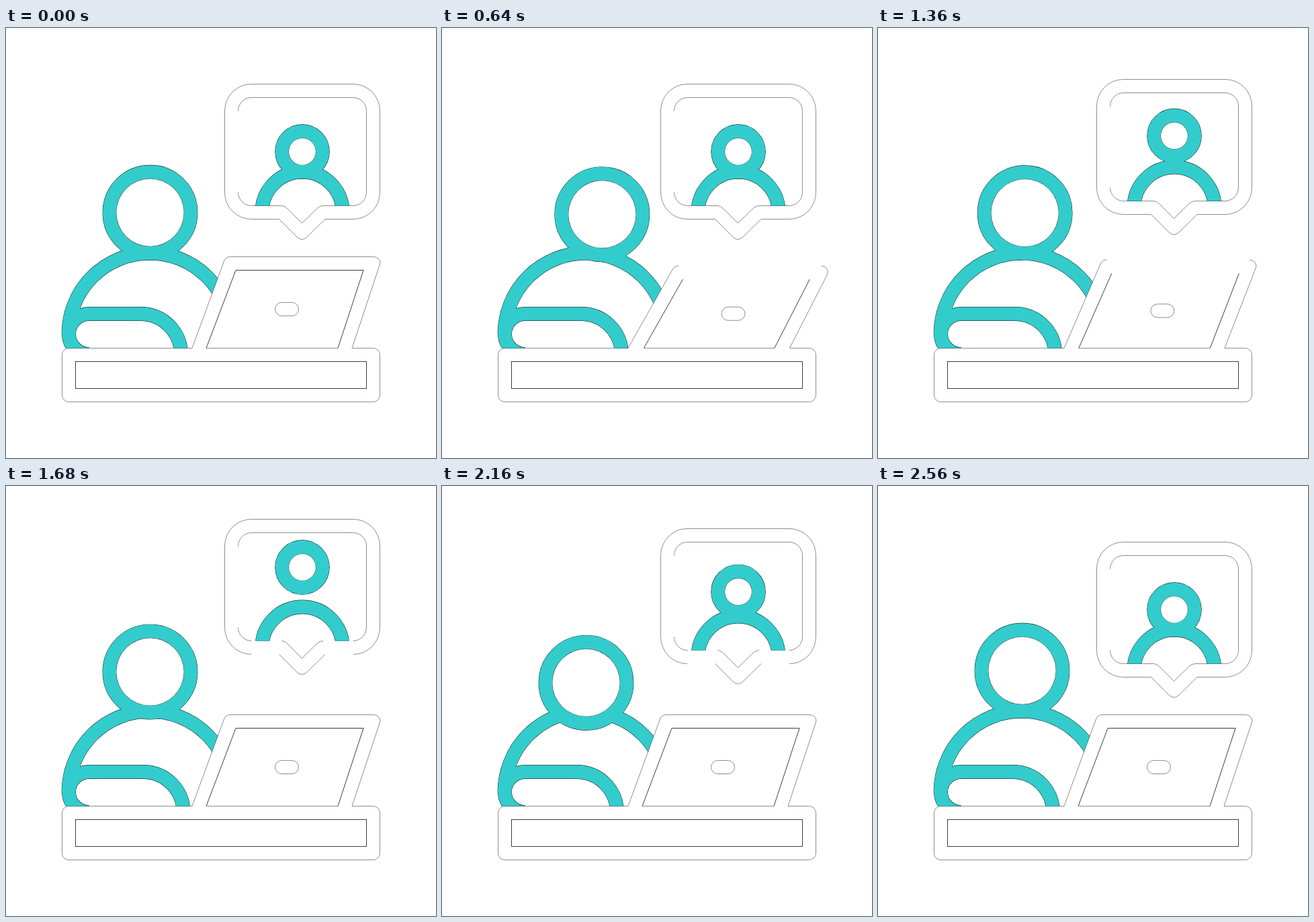
An HTML page that plays this animation: 640 px wide and 640 px high, repeating every 2.72 s.

```html
<!DOCTYPE html>
<html lang="en">
<head>
<meta charset="utf-8">
<title>Video call</title>
<style>
  html, body { margin: 0; width: 100%; height: 100%; overflow: hidden; background: #fff; }
  svg { display: block; width: 100vw; height: 100vh; }
  .line { fill: none; stroke: #1c1c1c; stroke-width: .5; }
  .bold { stroke-width: .85; }
  .edge { fill: none; stroke: #000; stroke-width: 20.8; }
  .teal { fill: none; stroke: #3cc; stroke-width: 20; }
  .hole { fill: #fff; stroke: #000; stroke-width: .5; }
  .cover { fill: #fff; }
</style>
</head>
<body>
<svg viewBox="0 0 640 640">
  <defs>
    <clipPath id="aboveDesk"><rect width="640" height="476.5"/></clipPath>
    <clipPath id="aboveFrame"><rect width="640" height="264.5"/></clipPath>
    <g id="torso">
      <path d="M93 456A121 121 0 0 1 335 456"/>
      <path id="arm"/>
    </g>
    <circle id="head" cx="214.5" cy="274.7" r="60.5"/>
    <path id="callerBody" d="M381 274A60 60 0 0 1 501 274"/>
    <circle id="callerHead" cx="441" cy="184" r="30.3"/>
  </defs>

  <g class="line">
    <rect x="83.5" y="476.5" width="473" height="80" rx="10"/>
    <rect class="bold" x="103.5" y="496.5" width="433" height="40"/>
  </g>

  <g clip-path="url(#aboveDesk)">
    <use href="#torso" class="edge"/>
    <use href="#head" class="edge lean"/>
    <use href="#torso" class="teal"/>
    <g class="lean">
      <circle class="hole" cx="214.5" cy="274.7" r="50.5"/>
      <use href="#head" class="teal"/>
    </g>
  </g>

  <path id="lidFill" class="cover"/>
  <g class="line">
    <path id="lidEdge"/>
    <path id="lidTop"/>
    <path id="screenEdge" class="bold"/>
    <path id="screenTop" class="bold"/>
    <path id="deskBack"/>
    <rect id="badge" x="400.5" y="408.5" width="35" height="20" rx="10"/>
  </g>

  <g id="bubble">
    <g class="line">
      <path d="M365 284.5A39.5 40 0 0 1 325.5 244.5V123.5A39.5 40 0 0 1 365 83.5H517A39.5 40 0 0 1 556.5 123.5V244.5A39.5 40 0 0 1 517 284.5"/>
      <path d="M345.5 123.5A20 20 0 0 1 365.5 103.5H516.5A20 20 0 0 1 536.5 123.5V244.5A20 20 0 0 1 516.5 264.5M365.5 264.5A20 20 0 0 1 345.5 244.5"/>
      <path d="M406.5 284.5L433.5 311.5Q440.5 317.5 447.5 311.5L475 284.5M410 264.5Q415 264.5 418.5 268.5L440.5 290.5L463 268.5Q467 264.5 472 264.5"/>
      <path id="bubbleBase" d="M365 284.5H406.5M475 284.5H517M365.5 264.5H410M472 264.5H516.5"/>
    </g>
    <g clip-path="url(#aboveFrame)">
      <use href="#callerBody" class="edge"/>
      <use href="#callerHead" class="edge nod"/>
      <use href="#callerBody" class="teal"/>
      <g class="nod">
        <circle class="hole" cx="441" cy="184" r="20.3"/>
        <use href="#callerHead" class="teal"/>
      </g>
    </g>
  </g>
</svg>
<script>
const LOOP = 2720, STEP = 40;
const $ = id => document.getElementById(id);
const set = (id, name, value) => $(id).setAttribute(name, value);
const move = (el, x, y) => el.setAttribute('transform', `translate(${x.toFixed(2)} ${y.toFixed(2)})`);
const show = (id, on) => set(id, 'visibility', on ? 'visible' : 'hidden');

const ease = (t, a, b) => {
  const u = Math.min(1, Math.max(0, (t - a) / (b - a)));
  return u * u * (3 - 2 * u);
};
// Rises from a to b, holds, then falls from c to d.
const hump = (t, a, b, c, d) => ease(t, a, b) - ease(t, c, d);

function drawLid(p) {
  const q = p / .926;
  const m = (a, b) => (a + (b - a) * q).toFixed(2);
  const at = (x0, y0, x1, y1) => m(x0, x1) + ' ' + m(y0, y1);
  const innerTop = m(360.5, 377.5);
  const leftEnd = at(333.5, 340.5, 357, 357.5), rightEnd = at(547, 340.5, 569, 357.5);
  const left = `M277 476.5L${at(324.5, 347, 348, 362)}Q${at(327, 340.5, 351, 357.5)} ${leftEnd}`;
  const corner = `C${at(553, 340.5, 576, 357.5)} ${at(559, 346, 581, 364)} ${at(556, 353, 577, 372)}`;
  const foot = m(515, 518);
  const inLeft = m(298, 301), inRight = m(494, 495);
  const topLeft = m(342, 362.5), topRight = m(532, 551);

  set('lidFill', 'd', `${left}L${rightEnd}${corner}L${foot} 477.2H277Z`);
  set('lidEdge', 'd', `${left}M${rightEnd}${corner}L${foot} 476.5`);
  set('lidTop', 'd', `M${leftEnd}L${rightEnd}`);
  set('screenEdge', 'd', `M${inLeft} 476.5L${topLeft} ${innerTop}M${topRight} ${innerTop}L${inRight} 476.5`);
  set('screenTop', 'd', `M${topLeft} ${innerTop}H${topRight}`);
  set('deskBack', 'd', `M${inLeft} 476.5H${inRight}`);
  const settled = p === 0 || p > .9;
  show('lidTop', settled);
  show('screenTop', settled);
  move($('badge'), 19.3 * q, 8.4 * q);
}

function draw(t) {
  const lean = 26.3 * hump(t, 250, 730, 1000, 1480);
  const dip = 19.6 * hump(t, 1590, 2060, 2080, 2550);
  document.querySelectorAll('.lean').forEach(el => move(el, lean, lean * .11 + dip));

  const reach = lean * .285 + 3.7 * hump(t, 1200, 1500, 1620, 2100);
  set('arm', 'd', `M123.5 485.5A30 30 0 0 1 123.5 425.5H${200.5 + reach}a60 60 0 0 1 60 60`);

  drawLid(hump(t, 320, 800, 1040, 1520));

  const lift = Math.round(35 * hump(t, 1200, 1740, 1920, 2455));
  move($('bubble'), 0, -lift);
  show('bubbleBase', lift < 12);

  const nod = 29 * hump(t, 1060, 1608, 1780, 2330);
  document.querySelectorAll('.nod').forEach(el => move(el, 0, -nod));
}

const start = performance.now();
function tick() {
  const t = (performance.now() - start) % LOOP;
  draw(Math.floor(t / STEP) * STEP);
  requestAnimationFrame(tick);
}
tick();
</script>
</body>
</html>
```
